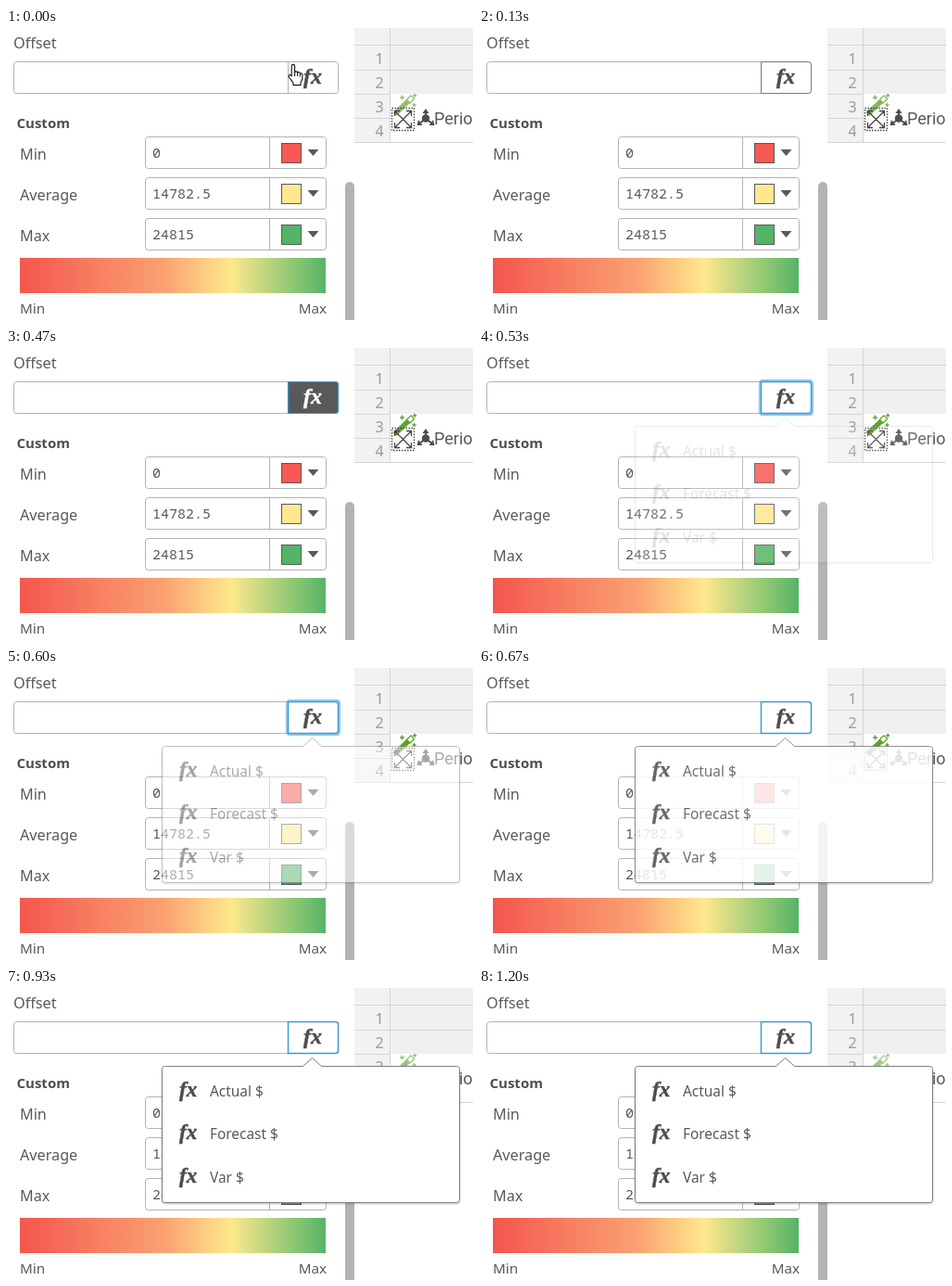
These frames come from a looping animation (504 by 315 pixels, 1.34 s). An HTML page:

```html
<!DOCTYPE html>
<html lang="en">
<head>
<meta charset="utf-8">
<title>Offset expression menu</title>
<style>
  html, body { margin: 0; width: 100%; height: 100%; overflow: hidden; background: #fff; }
  svg { display: block; width: 504px; height: 315px; }
  text { font-family: "Noto Sans", "Open Sans", sans-serif; font-size: 16.2px; fill: #595959; }
  .bold { font-size: 15px; font-weight: 700; fill: #4d4d4d; }
  .small { font-size: 15.2px; }
  .num { font-family: "Noto Sans Mono", "DejaVu Sans Mono", monospace; font-size: 15px; }
  .row { fill: #999; font-size: 16px; text-anchor: middle; }
  .cell { font-family: Roboto, sans-serif; font-size: 18px; }
  .fx { font: italic 700 24px "Liberation Serif", "Noto Serif", serif; stroke-width: .5; fill: #4d4d4d; stroke: #4d4d4d; }
  .menu .fx { font-size: 23px; }
  .menu .small { font-size: 15.4px; }
  .line { fill: none; stroke: #b3b3b3; }
</style>
</head>
<body>
<svg viewBox="0 0 504 315" xmlns="http://www.w3.org/2000/svg">
  <defs>
    <linearGradient id="scale">
      <stop offset="0" stop-color="#f5564f"/>
      <stop offset=".47" stop-color="#faa171"/>
      <stop offset=".69" stop-color="#ffe88c"/>
      <stop offset="1" stop-color="#54b567"/>
    </linearGradient>
    <filter id="shade" x="-5%" y="-5%" width="110%" height="115%">
      <feDropShadow dx="0" dy="1" stdDeviation="1" flood-color="#000" flood-opacity=".25"/>
    </filter>
  </defs>

  <!-- table -->
  <rect x="376" width="128" height="71" fill="#f0f0f0"/>
  <rect x="376" width="38" height="124" fill="#f2f2f2"/>
  <path class="line" style="stroke:#d4d4d4" d="M376 18.5H504M376 45.5H504M376 71.5H414M376 97.5H414M376 123.5H504M414.5 0V124"/>
  <g id="rows"></g>
  <g id="wand">
    <path d="M419.5 93L434 79" stroke="#5ca327" stroke-width="5.5" fill="none"/>
    <path d="M432.5 77.3L437 72.8L440.6 76.4L436 81Z" fill="#fff" stroke="#5ca327" stroke-width="1.3"/>
    <path d="M427.5 72.5v5M425 75h5M441.2 70.8v4M439.2 72.8h4M440.5 81v4M438.5 83h4" stroke="#5ca327" stroke-width="1.4"/>
  </g>
  <rect x="416.5" y="86.5" width="24" height="24" fill="none" stroke="#444" stroke-width="1.4" stroke-dasharray="1.5 1.5"/>
  <path d="M420 90L437 107M437 90L420 107M419.5 95V89.5H425M432 89.5H437.5V95M437.5 102V107.5H432M425 107.5H419.5V102" fill="none" stroke="#444" stroke-width="1.3"/>
  <g fill="#4d4d4d">
    <path d="M453 97V90M453 98L446 103M453 98L460 103" stroke="#4d4d4d" stroke-width="2"/>
    <circle cx="453" cy="97.5" r="4.2"/>
    <path d="M453 87l3.6 5h-7.2zM443.5 105l1.5-6 4.5 6zM462.5 105l-1.5-6-4.5 6z"/>
  </g>
  <text class="cell" x="462" y="104">Perio</text>

  <!-- properties panel -->
  <path d="M366 315V171a5 5 0 0 1 10 0V315Z" fill="#b3b3b3"/>
  <text x="8" y="21.5">Offset</text>
  <rect class="line" x="8.5" y="36.5" width="350" height="34" rx="3"/>
  <path class="line" d="M304.5 37V70"/>
  <rect id="glow" x="303" y="35" width="57" height="37" rx="3" fill="none" stroke="#6db5e3" stroke-width="2.4" opacity=".7"/>
  <path id="button" d="M304.5 36.5H355.5a3 3 0 0 1 3 3V67.5a3 3 0 0 1-3 3H304.5Z"/>
  <text id="label" class="fx" x="321" y="60">fx</text>
  <text class="bold" x="11.5" y="108">Custom</text>
  <g id="fields"></g>
  <rect x="15" y="248" width="330" height="38" fill="url(#scale)"/>
  <text class="small" x="15" y="308">Min</text>
  <text class="small" x="346" y="308" text-anchor="end">Max</text>

  <g id="menu" class="menu">
    <path d="M172.5 84.5H320.5L330.5 75.5L340.5 84.5H486.5a3 3 0 0 1 3 3V228.5a3 3 0 0 1-3 3H171.5a3 3 0 0 1-3-3V87.5a3 3 0 0 1 3-3Z" fill="#fff" stroke="#808080" filter="url(#shade)"/>
    <g id="items"></g>
  </g>

  <path id="hand" d="M308.2 41.2c0-2.4 3.4-2.4 3.4 0v6.6c.6-1.4 2.8-1.2 3 .4c.8-1 2.6-.6 2.8.8c1-.7 2.4 0 2.4 1.6v4.4l-1.8 4v2.6h-8v-2.4l-4.6-6.2c-1.2-1.8.8-3.2 2.2-1.8l.6.7ZM311.6 48v4M314.6 48.6v3.4M317.4 49.4v3" fill="#fff" stroke="#111" stroke-width="1.1" stroke-linejoin="round"/>
</svg>
<script>
const $ = id => document.getElementById(id);
const LOOP = 1340, TICKS = 20;

$('rows').innerHTML = [1, 2, 3, 4]
  .map(n => `<text class="row" x="403" y="${12.5 + 26 * n}">${n}</text>`).join('');

const fields = [
  ['Min', '0', '#f85852', 117, 142],
  ['Average', '14782.5', '#ffe88f', 161, 186],
  ['Max', '24815', '#54b567', 205, 230]
];
$('fields').innerHTML = fields.map(([name, value, color, y, base]) => `
  <text x="15" y="${base}">${name}</text>
  <rect class="line" x="150.5" y="${y + .5}" width="195" height="34" rx="3"/>
  <path class="line" d="M284.5 ${y + 1}v33"/>
  <text class="num" x="158" y="${base - 2.5}">${value}</text>
  <rect x="297.5" y="${y + 7.5}" width="21" height="21" fill="${color}" stroke="#595959"/>
  <path d="M325.5 ${y + 14}h12l-6 7z" fill="#595959"/>`).join('');

$('items').innerHTML = ['Actual $', 'Forecast $', 'Var $'].map((name, i) => {
  const y = 117 + 46.4 * i;
  return `<text class="fx" x="187" y="${y}">fx</text><text class="small" x="220" y="${y}">${name}</text>`;
}).join('');

// [time, value] steps, blended linearly
const pulse = [[0, .68], [270, .86], [470, .96], [600, 1], [670, 1], [930, .62], [1070, .52], [1200, .56], [1340, .66]];
const fade = [[470, 0], [530, .15], [600, .5], [670, .85], [730, 1]];

function mix(steps, t) {
  const i = steps.findIndex(s => s[0] >= t);
  if (i < 0) return steps[steps.length - 1][1];
  if (i === 0) return steps[0][1];
  const [t0, a] = steps[i - 1], [t1, b] = steps[i];
  return a + (b - a) * (t - t0) / (t1 - t0);
}

// [start, fill, border, border width, label colour]
const states = [
  [0, 'none', 'none', 1, '#4d4d4d'],
  [70, '#fff', '#7a7a7a', 1, '#4d4d4d'],
  [400, '#595959', '#3a94cf', 1.2, '#fff'],
  [530, '#fff', '#3a9bd6', 1.5, '#4d4d4d']
];

const starts = Array.from({ length: TICKS }, (_, n) => Math.round(n * 20 / 3) * 10);

function draw(now) {
  const ms = now % LOOP;
  const t = starts.filter(s => s <= ms).pop();
  const [, fill, border, width, ink] = states.filter(s => s[0] <= t).pop();
  $('button').setAttribute('fill', fill);
  $('button').setAttribute('stroke', border);
  $('button').setAttribute('stroke-width', width);
  $('label').style.fill = $('label').style.stroke = ink;
  $('glow').style.display = t >= 530 && t < 670 ? '' : 'none';
  $('hand').style.display = t < 70 ? '' : 'none';
  $('wand').style.opacity = mix(pulse, t);
  $('menu').style.opacity = mix(fade, t);
}

let origin;
function loop(now) {
  origin ??= now;
  draw(now - origin);
  requestAnimationFrame(loop);
}
draw(0);
requestAnimationFrame(loop);
</script>
</body>
</html>
```
